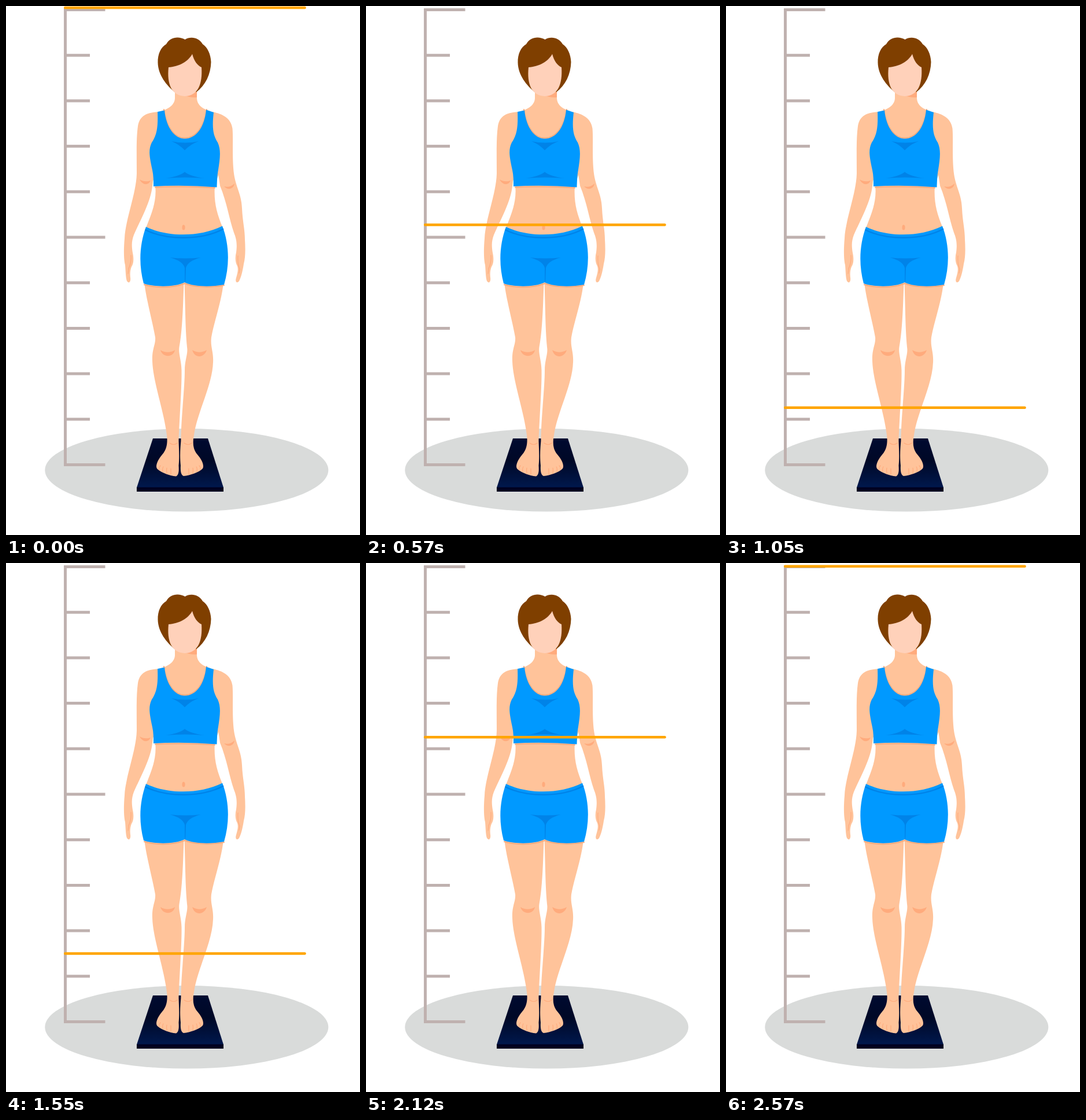
Write an HTML page that moves like this. It is 612x915 px and loops after 3.07 s.

```html
<!DOCTYPE html>
<html lang="en">
<head>
<meta charset="utf-8">
<title>Height scan</title>
<style>
html, body { margin: 0; width: 100%; height: 100%; overflow: hidden; background: #fff; }
svg { display: block; width: 612px; height: 915px; }
.skin { fill: #ffc39a; }
.fold { fill: #ffab7d; }
.crease { fill: none; stroke: #ffab7d; stroke-width: 1.2; stroke-linecap: round; }
.cloth { fill: #0099ff; }
.shade { fill: #0083e8; }
</style>
</head>
<body>
<svg viewBox="0 0 612 915">
  <defs>
    <linearGradient id="plate" x1="0" y1="0" x2="0" y2="1">
      <stop offset="0" stop-color="#000a30"/>
      <stop offset=".45" stop-color="#000826"/>
      <stop offset="1" stop-color="#00184d"/>
    </linearGradient>
  </defs>

  <ellipse cx="312.3" cy="802.8" rx="245" ry="71.8" fill="#d9dbda"/>
  <path id="ruler" fill="none" stroke="#bfb1af" stroke-width="5"/>

  <!-- scale -->
  <path d="M254 748H349L376 833H226Z" fill="url(#plate)"/>
  <path d="M226 832.5H376V840H226Z" fill="#00001f"/>

  <!-- legs and feet -->
  <g class="skin">
    <path d="M239 478C243 510 253 545 258 573C259 586 252 593 253 614C254 650 273 700 278 742C280 758 277 768 270 776C262 785 258 796 261 800C266 806 283 813 294 813.500C299 811 299 803 298.500 795C300 780 299 768 298.500 752C300 710 304 660 303.500 630C303 612 298 602 299.500 590C305 560 306 520 307.500 478Z"/>
    <path d="M376 478C373 510 360 545 355 573C353 590 359 598 358 616C357 655 331 702 325 742C322 758 324 768 331 776C339 785 343 795 340 800C335 806 318 812 307 813C302 811 301.500 803 302 795C300.500 780 301 768 302.500 752C303 710 309 660 309 630C309 612 315 602 313 590C310 560 310 520 308.500 478Z"/>
  </g>

  <!-- torso and arms -->
  <g class="skin">
    <path d="M292 140V160C291 174 276 180 262 184L254 300L258 310C261 338 252 358 241 386C280 405 340 405 375 384C364 358 359 338 361 310L368 290L359 184C346 180 331 175 330 160V140Z"/>
    <path d="M264 183C246 184 231 188 228 208C225 230 226 255 226 290C225 325 207 367 205 402C203 425 204 440 206 448C207 460 207 474 210 477C213 480 216 477 215 470C214 462 215 456 217 451C221 445 221 436 219 427C217 414 217 407 221 396C232 371 251 337 253 311L258 270Z"/>
    <path d="M357 183C375 187 389 194 391.500 212C393 230 391 252 393 280C395 312 407 322 408 350C409 373 413 386 413 404C414 420 414 435 411 446C409 460 405 474 402 477C398 480 396 476 398 470C400 463 402 456 400 450C396 443 396 434 398 426C400 410 398 402 394 392C386 369 382 340 370 311L364 270Z"/>
  </g>

  <path class="fold" d="M231 300C237 304 244 304 250 302C246 311 236 310 231 300ZM377 312C384 314 390 312 395 307C394 317 383 319 377 312Z"/>
  <path class="fold" d="M267 595C274 600 285 600 292 595C290 608 271 609 267 595ZM322 595C330 600 339 600 347 595C343 609 326 610 322 595Z"/>
  <ellipse cx="307" cy="383" rx="2.600" ry="4.500" class="fold"/>
  <g class="crease">
    <path d="M283 756Q290 761 296 756M308 756Q315 761 321 756"/>
    <path d="M265 802Q264 798 267 795M271 805Q270 800 272 797M278 808Q277 803 278 799M285 810Q285 804 285 800M336 802Q337 798 334 795M330 805Q331 800 329 797M323 808Q324 803 323 799M316 810Q316 804 316 800"/>
    <path d="M216 431Q217 444 212 454L211 463M401 432Q400 445 404 455L403 462"/>
    <path d="M258 313.500Q309 311 361 314.500M239 482C257 488 289 488 309 480C326 487 357 487 377 483" stroke-width="2"/>
    <path d="M273 181C277 213 292 230.500 309 230.500C328 230.500 343 212 347 181" transform="translate(0 -2)" stroke-width="2"/>
  </g>

  <!-- sportswear -->
  <path class="cloth" d="M262 183L274 180.500C277 211 292 229.500 309 229.500C328 229.500 343 211 346 179.500L359 184C356 211 358 224 366 236C372 249 370 263 367 283C365 294 365 302 364.500 313.500Q309 309 255 312C255 302 255 293 253 284C249 264 245 250 252 236C261 223 263 209 262 183Z"/>
  <path class="shade" d="M286 234Q310 239 333 234Q319 239 309 249.500Q299 239 286 234ZM275 298Q299 295 309 287Q319 295 344 298Q309 295 275 298Z"/>
  <path class="cloth" d="M242 382C280 400 335 400 374 380.500C386 412 387 448 377 482C354 486 325 486 309 478C290 487 256 486 238 480C229 446 231 412 242 382Z"/>
  <path d="M240.500 387C278 406 340 405 376 385.500" fill="none" stroke="#0083e8" stroke-width="2.500"/>
  <path class="shade" d="M283 435Q310 438 337 435Q314 441 311 453L310 478H309V453Q306 441 283 435Z"/>

  <!-- head -->
  <path class="fold" d="M306 154L330 147V158Q319 159 306 154Z"/>
  <path fill="#7f3f00" d="M309.500 58C319 52 333 54 340 66C348 71 354 83 354.500 97C354 118 345 137 329 149L309 130L292 149C277 137 263 119 262.500 98C262 83 268 71 277 66C284 53 299 52 309.500 58Z"/>
  <path fill="#ffd1ba" d="M281 106C299 105 315 96 322 83C325 95 331 103 338 106C340 135 332 155.500 309 156C286 155 278 135 281 106Z"/>

  <path id="bar" d="M102.200 0H516.500" stroke="#ffa500" stroke-width="4.500" stroke-linecap="round"/>
</svg>
<script>
const LOOP = 3070, TICK = 30, STEPS = 40, RISE_AT = 1400;
const TOP = 3, BOTTOM = 793.7, REST = 5.7;
const bar = document.getElementById('bar');

let ruler = 'M102.500 4V796';
for (let i = 0; i <= 10; i++) {
  ruler += `M102.500 ${6.500 + i * 78.700}H${i % 5 ? 145 : 171.500}`;
}
document.getElementById('ruler').setAttribute('d', ruler);

const progress = ms => Math.min(Math.floor(ms / TICK), STEPS) / STEPS;

function barY(t) {
  return t < RISE_AT
    ? TOP + (BOTTOM - TOP) * progress(t)
    : BOTTOM + (REST - BOTTOM) * progress(t - RISE_AT + TICK);
}

const start = performance.now();
function draw() {
  const t = (performance.now() - start) % LOOP;
  bar.setAttribute('transform', `translate(0 ${barY(t)})`);
  requestAnimationFrame(draw);
}
draw();
</script>
</body>
</html>
```
